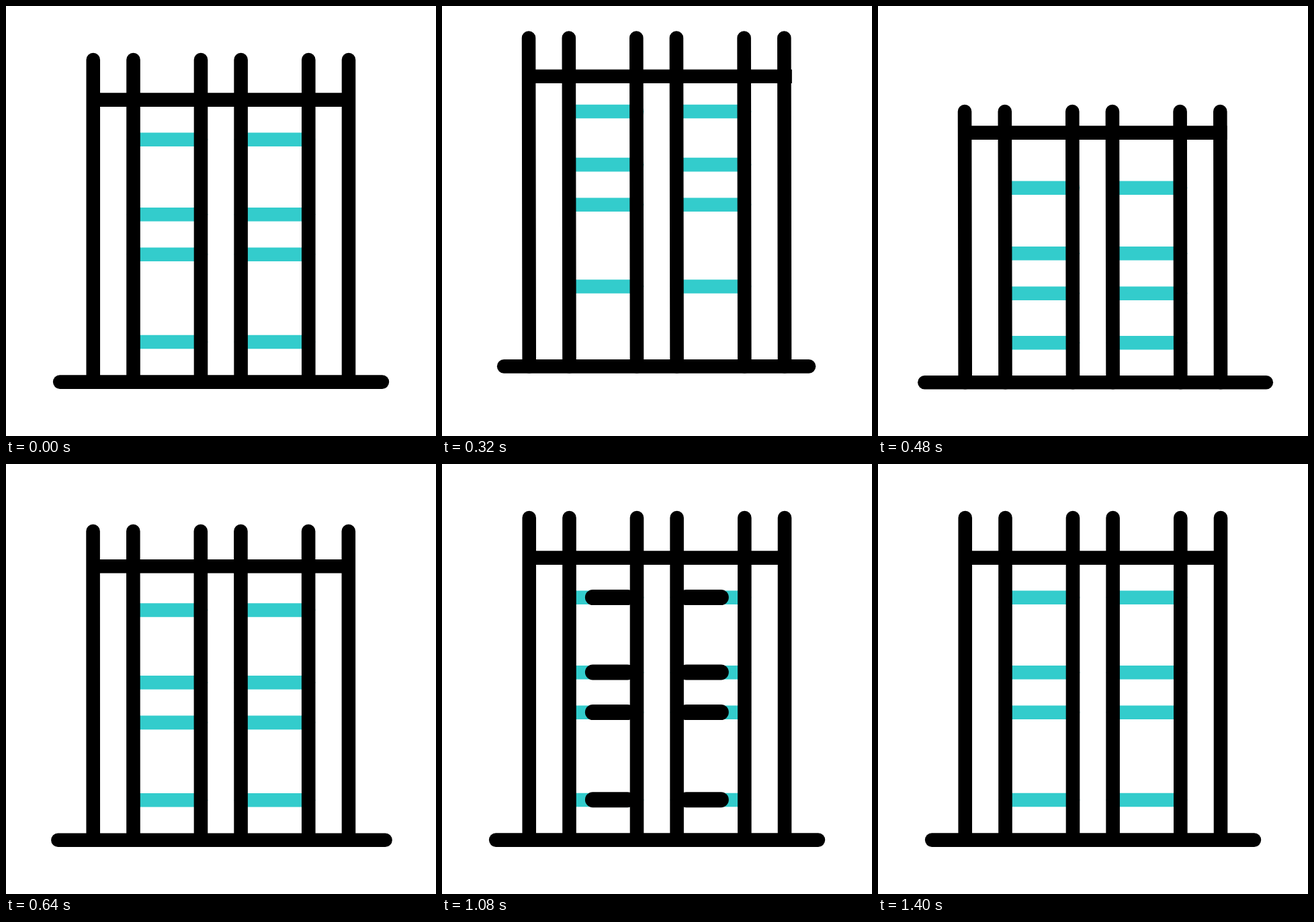
Animation, 640 px wide and 640 px high, one loop 1.48 s. Source, as an HTML page with a canvas:

```html
<!DOCTYPE html>
<html lang="en">
<head>
<meta charset="utf-8">
<title>Fence</title>
<style>
  html, body { margin: 0; width: 100%; height: 100%; overflow: hidden; background: #fff; }
  canvas { display: block; }
</style>
</head>
<body>
<canvas id="stage" width="640" height="640"></canvas>
<script>
const ctx = document.getElementById('stage').getContext('2d');
const LOOP = 1480, STEP = 40;
const BLACK = '#000', TEAL = '#33cccc';
const POSTS = [129.75, 189.5, 290, 349.6, 450.3, 510];

// Each part: [rest, offset at the top of the jump, offset when squashed]
const PARTS = {
  top: [80, -45.2, 77],
  lean: [0, -0.7, -0.7],
  bar: [139.6, -44.5, 49],
  barEnd: [520, 1, -0.5],
  ground: [559.6, -26, 0.6],
  left: [80.2, 14.6, -10.8],
  right: [559.9, -17.6, 17.9]
};
const RUNGS = [[198.8, -55, 72], [310.2, -89.4, 58], [369.8, -89.4, 58], [500, -92.2, 1.2]];

// Eased progress from time a to time b
const ease = (t, a, b) => {
  const u = Math.min(1, Math.max(0, (t - a) / (b - a)));
  return u * u * (3 - 2 * u);
};

function line(x1, y1, x2, y2, color = BLACK, width = 20.6, cap = 'round') {
  ctx.strokeStyle = color;
  ctx.lineWidth = width;
  ctx.lineCap = cap;
  ctx.beginPath();
  ctx.moveTo(x1, y1);
  ctx.lineTo(x2, y2);
  ctx.stroke();
}

function draw(t) {
  const fall = ease(t, 280, 480);
  const jump = ease(t, 80, 280) * (1 - fall);
  const squash = fall * (1 - ease(t, 480, 720));
  const at = ([rest, up, down]) => rest + up * jump + down * squash;
  const p = Object.fromEntries(Object.entries(PARTS).map(([k, v]) => [k, at(v)]));
  const reach = ease(t, 720, 1000) * (1 - ease(t, 1000, 1400));

  ctx.fillStyle = '#fff';
  ctx.fillRect(0, 0, 640, 640);

  for (const rung of RUNGS) {
    const y = at(rung);
    line(190, y, 290, y, TEAL);
    line(350, y, 450, y, TEAL);
    if (reach > 0) {
      const tip = 292.5 - 76 * reach, root = Math.max(276, tip);
      line(tip, y - 0.3, root, y - 0.3, BLACK, 23);
      line(639.7 - tip, y - 0.3, 639.7 - root, y - 0.3, BLACK, 23);
    }
  }

  for (const x of POSTS) line(x + p.lean, p.top, x, p.ground);
  line(120, p.bar, p.barEnd, p.bar, BLACK, 20.6, 'butt');
  line(p.left, p.ground, p.right, p.ground);
}

function tick() {
  const t = performance.now() % LOOP;
  draw(Math.floor(t / STEP) * STEP);
  requestAnimationFrame(tick);
}
tick();
</script>
</body>
</html>
```
